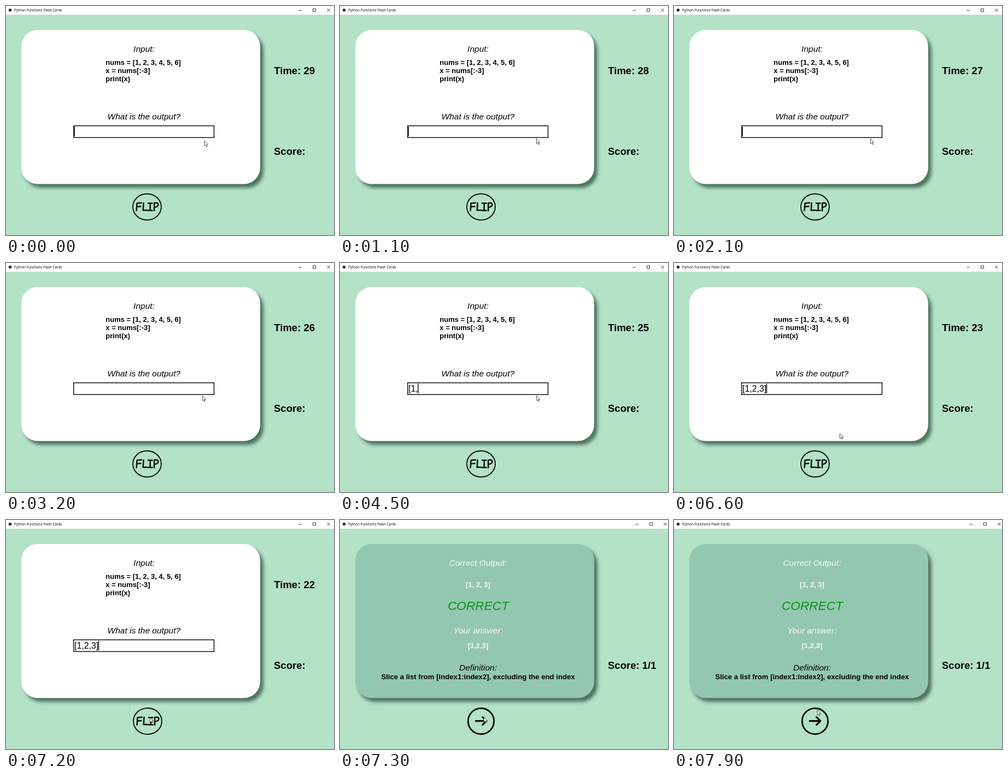
These frames come from a looping animation (600 by 420 pixels, 8000 ms). An HTML page:

```html
<!DOCTYPE html>
<html lang="en">
<head>
<meta charset="utf-8">
<title>Flash Cards</title>
<style>
  html, body { margin: 0; width: 100%; height: 100%; overflow: hidden; background: #b4e2c7; }
  svg { display: block; width: 600px; height: 420px; font-family: "Liberation Sans", Arial, sans-serif; }
  .bar { font: 6.4px "Open Sans", sans-serif; }
  .label { font-size: 15.5px; font-style: italic; }
  .code { font-size: 13px; font-weight: bold; }
  .stat { font-size: 18.5px; font-weight: bold; }
  .mid { text-anchor: middle; }
  .pale { fill: #f6fbf8; }
  .ink { fill: none; stroke: #0a0d0b; stroke-linecap: round; stroke-linejoin: round; }
  #card { filter: drop-shadow(6px 7px 3.2px rgba(38, 72, 54, .72)); }
</style>
</head>
<body>
<svg viewBox="0 0 600 420">
  <rect width="600" height="420" fill="#b4e2c7"/>

  <rect width="600" height="16" fill="#fff"/>
  <circle cx="7.5" cy="7.5" r="2.8" fill="#333"/>
  <text class="bar" x="15" y="10">Python Functions Flash Cards</text>
  <path id="controls" d="M535.5 8H541 M561.5 5H566.5V10H561.5Z M587.3 5L592.7 10.2M592.7 5L587.3 10.2"
        fill="none" stroke="#222" stroke-width=".9"/>

  <rect id="card" x="28" y="44" width="437" height="282.5" rx="30"/>

  <g id="front">
    <text class="label mid" x="252.5" y="84">Input:</text>
    <g class="code">
      <text x="182.3" y="107.7">nums = [1, 2, 3, 4, 5, 6]</text>
      <text x="182.3" y="122.7">x = nums[:-3]</text>
      <text x="182.3" y="137.7">print(x)</text>
    </g>
    <text class="label mid" x="252.3" y="208">What is the output?</text>
    <rect x="123.7" y="219.7" width="256.8" height="21.6" fill="#fff" stroke="#111" stroke-width="1.5"/>
    <text id="answer" x="125" y="236" font-size="15.9"></text>
    <rect id="caret" y="221.5" width="1.4" height="17.5"/>
    <text id="timer" class="stat" x="490.3" y="125"></text>
    <path id="edge" d="M230.5 395.5V341.5H285.5" fill="none" stroke="#cdecdb"/>
    <g id="flip" class="ink">
      <ellipse cx="258" cy="368.5" rx="26" ry="24" stroke-width="1.9"/>
      <path stroke-width="2.5" d="M248 361L239.6 361.8L238.6 375.3M239.2 368.2L246.6 367.6
        M251.6 361.3L250.8 374.8L257.6 374.4
        M260 361.8H267.6M263.9 361.8L263.6 374.8M259.6 374.9H267.8
        M271.2 361.5V375.6M271.2 361.7C276 360 279.3 362 278.4 365C277.6 367.8 274.5 369 271.4 369.3"/>
    </g>
  </g>

  <g id="back">
    <text class="label mid pale" x="252.5" y="84">Correct Output:</text>
    <text class="code mid pale" x="252.5" y="122.8">[1, 2, 3]</text>
    <text class="mid" x="253" y="165" font-size="22.7" font-style="italic" fill="#079412">CORRECT</text>
    <text class="label mid pale" x="252.5" y="208">Your answer:</text>
    <text class="code mid pale" x="252.5" y="235.3">[1,2,3]</text>
    <text class="label mid" x="252.5" y="275.5">Definition:</text>
    <text class="code mid" x="252.5" y="291.7" style="font-size:13.15px">Slice a list from [index1:index2], excluding the end index</text>
    <g class="ink">
      <circle cx="258" cy="369" r="23.7" stroke-width="2.9"/>
      <path stroke-width="3.2" d="M248.3 368.7H267.5M260.8 361.7L267.8 368.7L260.8 375.7"/>
    </g>
  </g>

  <text id="score" class="stat" x="490" y="273"></text>
  <path id="cursor" d="M0 0V9.2L2.1 7.3L3.7 10.9L5.2 10.2L3.6 6.8H6.5Z" fill="#fff" stroke="#222" stroke-width=".75"/>
</svg>

<script>
const LOOP = 8000, STEP = 100;
const FIRST_TICK = 900, PRESS = 7100, FLIP = 7300;
const ANSWER = "[1,2,3]";
const keyTimes = [3500, 4200, 4500, 4800, 5100, 5400, 5700];

// Pointer moves: start, end, from, to
const moves = [
  [100, 800, [363, 247.3], [359.3, 243.3]],
  [6100, 7000, [359.3, 243.3], [263.3, 362]],
  [7300, 7800, [263.3, 361.5], [262, 348.5]]
];

const el = id => document.getElementById(id);
const show = (id, on) => el(id).setAttribute("display", on ? "inline" : "none");
const shift = (id, x, y) => el(id).setAttribute("transform", `translate(${x} ${y})`);
const ease = p => p * p * (3 - 2 * p);

function pointerAt(t) {
  const [start, end, from, to] = moves.filter(m => t >= m[0]).pop() || moves[0];
  const p = ease(Math.min(1, Math.max(0, (t - start) / (end - start))));
  return from.map((v, i) => v + (to[i] - v) * p);
}

// The caret is on for 600 ms, then off for 300 ms
const caretOn = t => (t + 100) % 900 < 600;

function draw(t) {
  const flipped = t >= FLIP;
  const pressed = t >= PRESS && !flipped;
  show("front", !flipped);
  show("back", flipped);
  show("edge", pressed);
  show("caret", caretOn(t));
  shift("flip", pressed ? 1 : 0, pressed ? .5 : 0);
  shift("controls", flipped ? 5 : 0, 0);
  el("card").setAttribute("fill", flipped ? "#94c7b0" : "#fff");

  const typed = ANSWER.slice(0, keyTimes.filter(k => t >= k).length);
  el("answer").textContent = typed;
  el("caret").setAttribute("x", 124.6 + (typed ? el("answer").getComputedTextLength() : 0));

  const ticks = Math.max(0, Math.floor((t - FIRST_TICK) / 1000) + 1);
  el("timer").textContent = "Time: " + (29 - ticks);
  el("score").textContent = flipped ? "Score: 1/1" : "Score:";
  shift("cursor", ...pointerAt(t));
}

const origin = performance.now();
function frame() {
  const t = (performance.now() - origin) % LOOP;
  draw(Math.floor(t / STEP) * STEP);
  requestAnimationFrame(frame);
}
frame();
</script>
</body>
</html>
```
